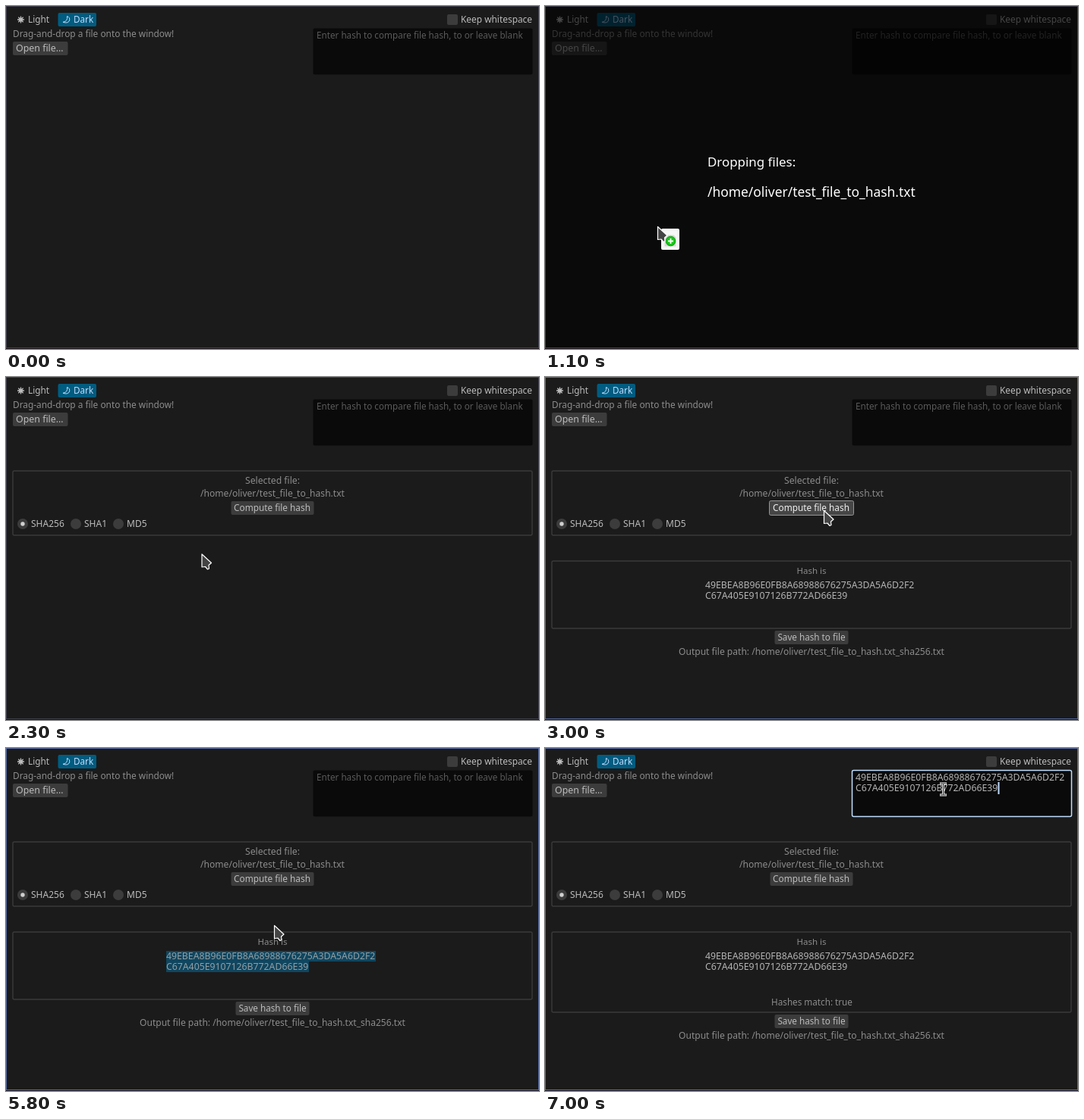
An HTML page that plays this animation: 702 by 453 pixels, repeating every 8000 ms.

```html
<!DOCTYPE html>
<html lang="en">
<head>
<meta charset="utf-8">
<title>File hasher</title>
<style>
  html, body { margin: 0; width: 100%; height: 100%; overflow: hidden; background: #1b1b1b; }
  svg { display: block; width: 702px; height: 453px; }
  text { font: 12px "Noto Sans", "Open Sans", sans-serif; fill: #8c8c8c; white-space: pre; }
  .mid { text-anchor: middle; }
  .lit { fill: #bcbcbc; }
  .hash { font-size: 12.28px; fill: #b4b4b4; }
  .button { fill: #3c3c3c; }
  .frame { fill: none; stroke: #3a3a3a; stroke-width: 1.4; }
</style>
</head>
<body>
<svg viewBox="0 0 702 453">
  <rect width="702" height="453" fill="#1b1b1b"/>

  <!-- toolbar -->
  <path d="M19.5 13.5v9M15 18h9M16.3 14.8l6.4 6.4M22.7 14.8l-6.4 6.4" stroke="#bcbcbc" stroke-width="1.3"/>
  <circle cx="19.5" cy="18" r="2.6" fill="#bcbcbc"/>
  <text class="lit" x="29" y="22" style="font-size:11.8px">Light</text>
  <rect x="68.5" y="9" width="50.5" height="18" rx="2" fill="#005c80"/>
  <path d="M80.5 13.5Q84.5 15 83.6 19Q82 23.5 75 21.3Q81.500 20.500 80.500 13.500Z" fill="none" stroke="#c0deff"/>
  <text x="89" y="22" style="font-size:11.7px;fill:#c0deff">Dark</text>
  <rect class="button" x="581" y="11" width="14" height="14" rx="2"/>
  <text class="lit" x="599" y="22" style="font-size:11.9px">Keep whitespace</text>
  <text x="9" y="41" style="font-size:11.87px">Drag-and-drop a file onto the window!</text>
  <rect class="button" x="9" y="47" width="72.500" height="18" rx="2"/>
  <text class="lit" x="13" y="60" style="font-size:12.4px">Open file…</text>

  <!-- hash input -->
  <rect id="input" x="404.5" y="29.5" width="289" height="61" rx="2" fill="#0a0a0a"/>
  <text id="hint" x="409" y="43" style="font-size:11.7px;fill:#5a5a5a">Enter hash to compare file hash, to or leave blank</text>
  <g id="pasted">
    <text class="hash" x="409" y="43">49EBEA8B96E0FB8A68988676275A3DA5A6D2F2</text>
    <text class="hash" x="409" y="57">C67A405E9107126B772AD66E39</text>
  </g>
  <rect id="caret" width="2" height="16" fill="#c0deff"/>

  <g id="file">
    <rect class="frame" x="9" y="124" width="684" height="85" rx="2"/>
    <text class="mid" x="351" y="141" style="font-size:12.2px">Selected file:</text>
    <text class="mid" x="351" y="158" style="font-size:12.080px">/home/oliver/test_file_to_hash.txt</text>
    <rect id="compute" rx="2"/>
    <text id="computeText" class="mid" x="350.5" y="177" style="font-size:11.8px">Compute file hash</text>
    <g class="button">
      <circle cx="22" cy="194" r="7"/>
      <circle cx="92" cy="194" r="7"/>
      <circle cx="148" cy="194" r="7"/>
    </g>
    <circle cx="22" cy="194" r="2.700" fill="#d0d0d0"/>
    <text class="lit" x="33" y="198">SHA256</text>
    <text class="lit" x="103" y="198">SHA1</text>
    <text class="lit" x="159" y="198">MD5</text>
  </g>

  <g id="result">
    <rect id="resultFrame" class="frame" x="9" y="243" width="684" rx="2"/>
    <text class="mid" x="351" y="260" style="font-size:11.5px">Hash is</text>
    <path id="selection" d="M211 268H487V282H399V296H211Z" fill="#10465f"/>
    <g id="digest">
      <text class="hash" x="211" y="279">49EBEA8B96E0FB8A68988676275A3DA5A6D2F2</text>
      <text class="hash" x="211" y="293">C67A405E9107126B772AD66E39</text>
    </g>
    <text id="match" class="mid" x="351.5" y="340" style="font-size:11.7px">Hashes match: true</text>
    <g id="save">
      <rect class="button" x="302.5" y="335" width="97" height="18" rx="2"/>
      <text class="mid lit" x="351" y="348" style="font-size:11.7px">Save hash to file</text>
      <text class="mid" x="351" y="367" style="font-size:12.050px">Output file path: /home/oliver/test_file_to_hash.txt_sha256.txt</text>
    </g>
  </g>

  <g id="overlay">
    <rect x="1" y="1" width="700" height="450" fill="#000" opacity=".63"/>
    <text x="214" y="212" style="font-size:16.9px;fill:#fff">Dropping files:</text>
    <text x="214" y="252" style="font-size:17.42px;fill:#fff">/home/oliver/test_file_to_hash.txt</text>
  </g>

  <rect y="452" width="702" height="1" fill="#1a1214"/>
  <rect id="border" x=".5" y=".5" width="701" height="451" fill="none"/>

  <g id="pointer">
    <g id="drag">
      <rect x="4.500" y="2.500" width="24" height="28" rx="2" fill="#f6f6f6"/>
      <path d="M9 11H21L24 14V26H9Z" fill="#d6d6d6"/>
      <circle cx="17" cy="19" r="6.300" fill="#14c814" stroke="#0a8a0a" stroke-width=".8"/>
      <path d="M17 15.500v7M13.500 19h7" stroke="#fff" stroke-width="1.800"/>
    </g>
    <path id="arrow" d="M0 0V17L4.500 16.500 7.500 20 9.500 19 9 14.500 12.500 11.500Z" fill="#444" stroke="#fff" stroke-width="1.200" stroke-linejoin="round"/>
    <g id="beam" fill="none">
      <path d="M-4.500 -7.500H4.500M0 -8V8M-4.500 7.500H4.500" stroke="#fff" stroke-width="3"/>
      <path d="M-4 -7.500H4M0 -7V7M-4 7.500H4" stroke="#111"/>
    </g>
  </g>
</svg>
<script>
const el = {};
document.querySelectorAll('[id]').forEach(e => el[e.id] = e);
const show = (name, on) => el[name].style.display = on ? '' : 'none';
const set = (name, attrs) => {
  for (const key in attrs) el[name].setAttribute(key, attrs[key]);
};

// pointer path: time, x, y
const path = [
  [700, 30, 450], [1100, 148.5, 291.5], [2000, 148.5, 291.5], [2600, 367.5, 176.5],
  [3400, 367.5, 176.5], [3800, 340, 276], [4000, 334, 267.5], [5700, 334, 267.5],
  [5800, 353.5, 234.5], [6000, 513.5, 99.5], [6100, 513.5, 99.5],
  [6200, 524.5, 68], [6300, 524.5, 54.5], [8000, 524.5, 54.5]
];

function pointerAt(t) {
  const i = Math.max(1, path.findIndex(k => k[0] >= t));
  const [t0, x0, y0] = path[i - 1], [t1, x1, y1] = path[i];
  const u = Math.max(0, (t - t0) / (t1 - t0)), e = u * u * (3 - 2 * u);
  return [x0 + (x1 - x0) * e, y0 + (y1 - y0) * e];
}

function draw(now) {
  const t = Math.floor(now % 8000 / 100) * 100;
  const [x, y] = pointerAt(t);
  const dragging = t >= 800 && t < 1500;
  const selected = t >= 4600 && t < 6500;
  const focused = t >= 6500, pasted = t >= 7000;
  const overInput = t >= 6200 && x > 405 && y > 29 && y < 91;
  const overDigest = t >= 3000 && x > 211 && x < 487 && y > 266 && y < 296;
  const hover = x > 297 && x < 405 && y > 164 && y < 182;
  const pressed = t === 2900;

  show('overlay', dragging);
  show('drag', dragging);
  show('pointer', t >= 800);
  show('beam', overInput || overDigest);
  show('arrow', !overInput && !overDigest);
  set('pointer', { transform: `translate(${x} ${y})` });
  set('border', { stroke: t >= 2900 ? '#566aa4' : '#41414f' });

  show('file', t >= 1600);
  set('compute', hover
    ? { x: 295.5, y: 163.5, width: 111, height: 19, fill: pressed ? '#373737' : '#464646', stroke: pressed ? '#fff' : '#969696' }
    : { x: 296.5, y: 164, width: 109, height: 18, fill: '#3c3c3c', stroke: 'none' });
  el.computeText.style.fill = pressed ? '#fff' : hover ? '#f0f0f0' : '#bcbcbc';

  show('result', t >= 3000);
  show('selection', selected);
  el.digest.style.opacity = selected ? .8 : 1;
  show('match', pasted);
  set('resultFrame', { height: pasted ? 106 : 89 });
  set('save', { transform: `translate(0 ${pasted ? 17 : 0})` });

  set('input', { stroke: focused ? '#c0deff' : overInput ? '#969696' : 'none', 'stroke-width': focused ? 1.5 : 1 });
  show('hint', !pasted);
  show('pasted', pasted);
  show('caret', focused);
  set('caret', pasted ? { x: 596.5, y: 45 } : { x: 408, y: 31 });
}

const start = performance.now();
function tick() {
  draw(performance.now() - start);
  requestAnimationFrame(tick);
}
tick();
</script>
</body>
</html>
```
